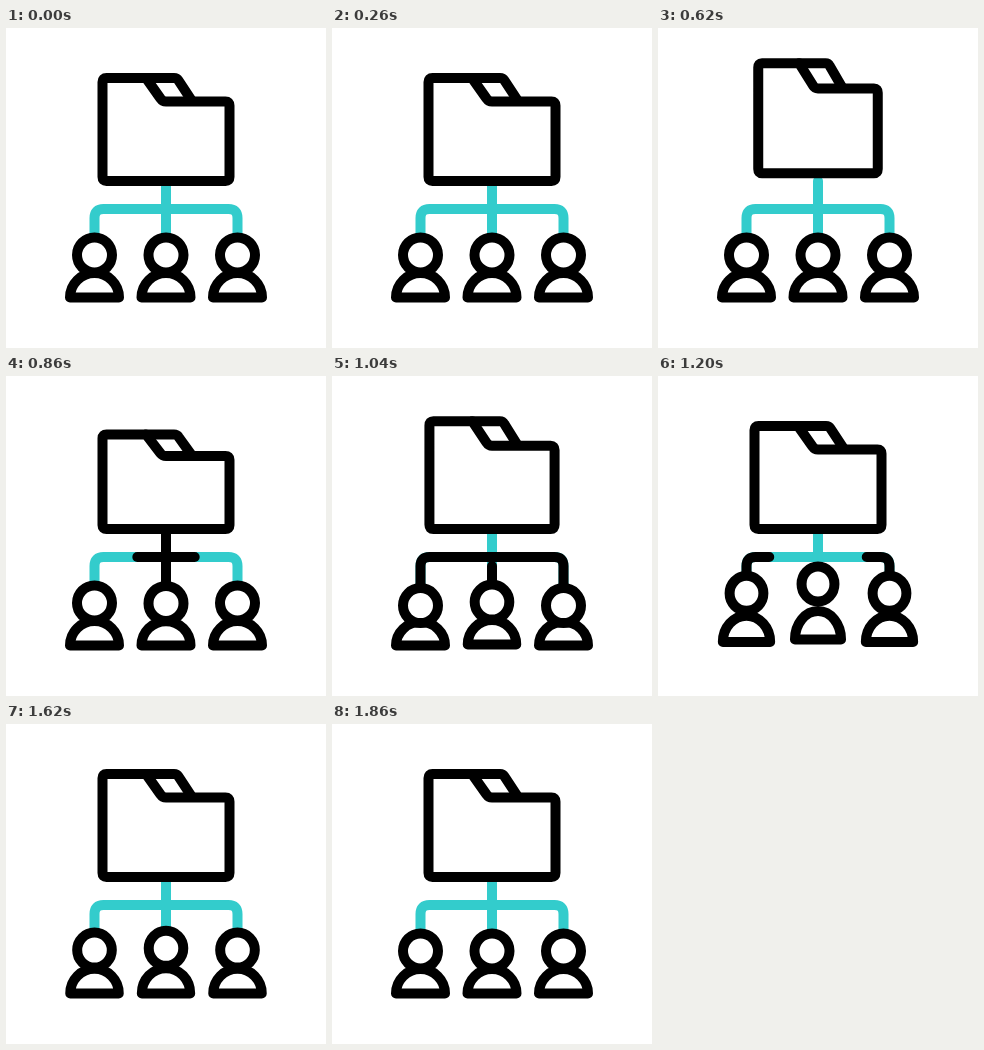
An HTML page for the animation above (1960 ms loop, 320 px wide and 320 px high).

```html
<!DOCTYPE html>
<html lang="en">
<head>
<meta charset="utf-8">
<title>Shared folder</title>
<style>
  html, body { margin: 0; height: 100%; overflow: hidden; background: #fff; }
  svg { display: block; width: 100vw; height: 100vh; }
  path, circle {
    fill: none; stroke: #000; stroke-width: 10;
    stroke-linecap: round; stroke-linejoin: round;
    vector-effect: non-scaling-stroke;
  }
  .wire { stroke: #33cccc; }
  .pulse { vector-effect: none; }
  .solid { fill: #fff; }
</style>
</head>
<body>
<svg viewBox="0 0 320 320">
  <g id="wires"></g>
  <g id="people"></g>
  <g id="folder">
    <path class="solid" d="M96.5 54q0-4 4-4H140L154.500 70.500Q156.500 73.500 160 73.500H219.500q4 0 4 4V149q0 4-4 4H100.500q-4 0-4-4Z"/>
    <path d="M140 50H168q3 0 4.500 2.500L185 71.500"/>
  </g>
</svg>
<script>
const LOOP = 1960;
const get = id => document.getElementById(id);
const ease = p => (1 - Math.cos(Math.PI * Math.min(1, Math.max(0, p)))) / 2;
const ramp = (t, from, to) => ease((t - from) / (to - from));

function add(parent, tag, attrs) {
  const node = document.createElementNS('http://www.w3.org/2000/svg', tag);
  for (const key in attrs) node.setAttribute(key, attrs[key]);
  return parent.appendChild(node);
}

// Bounce poses: rest, crouch, peak, landing, rebound, rest
const POSE_TIMES = [0, 160, 380, 600, 760, 940];
const WIDTH = [1, 1, 0.94, 1, 0.985, 1];
const FOLDER = { lift: [0, 0, -8, 0, 0, 0], height: [1, 0.956, 1.068, 0.917, 1.048, 1] };
const BODY = { lift: [0, 0, -6, 0, 0, 0], height: [1, 0.96, 1.16, 0.93, 1.04, 1] };
const HEAD_LIFT = [0, 3, -19, 4, -3, 0];

function pose(values, t) {
  let v = values[0];
  for (let i = 1; i < values.length; i++)
    v += (values[i] - values[i - 1]) * ramp(t, POSE_TIMES[i - 1], POSE_TIMES[i]);
  return v;
}

// Scale around (x, base) and lift
function squash(node, x, base, { lift, height }, t) {
  node.setAttribute('transform', `translate(${x} ${base + pose(lift, t)}) ` +
    `scale(${pose(WIDTH, t)} ${pose(height, t)}) translate(${-x} ${-base})`);
}

const STEM = { d: 'M160 153V209', head: [680, 840], tail: [920, 1120] };
const arm = d => ({ d, head: [780, 1000], tail: [1100, 1300] });
const wires = [
  arm('M160 181H97.500q-9 0-9 9V209'),
  arm('M160 181H222.500q9 0 9 9V209'),
  STEM
];
for (const w of wires) add(get('wires'), 'path', { d: w.d, class: 'wire' });
for (const w of wires) w.node = add(get('wires'), 'path', { d: w.d, class: 'pulse', pathLength: 1 });

const people = [[88.5, 920], [160, 820], [231.5, 920]].map(([x, start]) => ({
  x, start,
  body: add(get('people'), 'path', { class: 'solid', d: `M${x - 24.5} 269.500a24.500 24.500 0 0 1 49 0z` }),
  head: add(get('people'), 'ellipse', {
    cx: x, cy: 227, ry: 17.5, fill: '#fff', stroke: '#000', 'stroke-width': 10
  })
}));

function draw(t) {
  squash(get('folder'), 160, 153, FOLDER, t - 260);
  for (const { x, start, body, head } of people) {
    squash(body, x, 269.5, BODY, t - start);
    head.setAttribute('cy', 227 + pose(HEAD_LIFT, t - start));
    head.setAttribute('rx', 17.5 * pose(WIDTH, t - start));
  }
  for (const { node, head, tail } of wires) {
    const a = ramp(t, ...tail), b = ramp(t, ...head);
    node.style.display = b > a ? '' : 'none';
    node.setAttribute('stroke-dasharray', `${b - a} 9`);
    node.setAttribute('stroke-dashoffset', -a);
  }
}

const begin = performance.now();
function tick() {
  draw((performance.now() - begin) % LOOP);
  requestAnimationFrame(tick);
}
tick();
</script>
</body>
</html>
```
